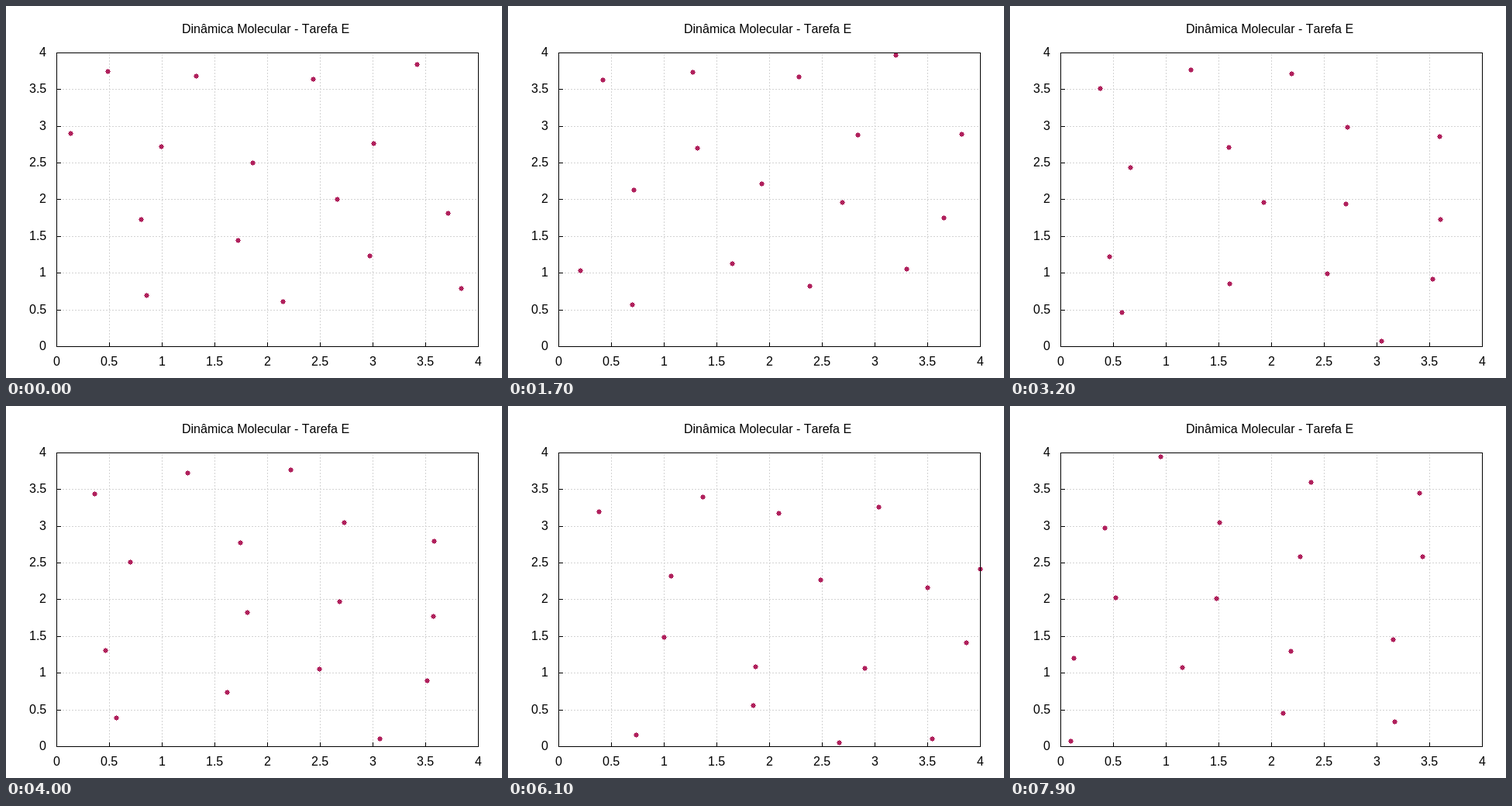
Recreate the animation shown at these times as an HTML page with a canvas. Size 640x480 px, loop 8000 ms.

```html
<!DOCTYPE html>
<html lang="pt">
<head>
<meta charset="utf-8">
<title>Dinâmica Molecular - Tarefa E</title>
<style>
html, body { margin: 0; width: 100%; height: 100%; overflow: hidden; background: #fff; }
canvas { display: block; }
</style>
</head>
<body>
<canvas id="stage" width="640" height="480"></canvas>
<script>
const ctx = document.getElementById('stage').getContext('2d');
const LEFT = 65, TOP = 60, RIGHT = 609, BOTTOM = 439;
const W = RIGHT - LEFT, H = BOTTOM - TOP;
const LOOP = 8000, STEP = 100, MID = 4000, END = 7900;

// Each particle drifts through three points; places outside the box wrap around.
const particles = [
  [[83, 164], [8, 174], [136, 247]],
  [[131, 84], [114, 113], [122, 157]],
  [[245, 90], [234, 86], [270, 150]],
  [[396, 94], [367, 82], [496, 28]],
  [[530, 75], [482, 50], [622, 53]],
  [[200, 181], [302, 176], [388, 98]],
  [[318, 202], [311, 266], [82, 325]],
  [[474, 177], [436, 150], [528, 112]],
  [[427, 249], [430, 252], [374, 194]],
  [[174, 275], [160, 201], [266, 248]],
  [[299, 302], [285, 369], [352, 396]],
  [[469, 322], [543, 354], [362, 316]],
  [[570, 267], [551, 271], [532, 194]],
  [[587, 364], [672, 315], [494, 301]],
  [[181, 373], [142, 402], [194, 444]],
  [[357, 381], [404, 339], [222, 337]]
];

// Cubic Hermite between p and q, with slopes m and n per unit of s.
function hermite(p, q, m, n, s) {
  const r = 1 - s;
  return p * r * r * (1 + 2 * s) + q * s * s * (3 - 2 * s) + s * r * (m * r - n * s);
}

function along([a, b, c], t) {
  const turn = (c - a) / END, late = END - MID;
  return t < MID
    ? hermite(a, b, b - a, turn * MID, t / MID)
    : hermite(b, c, turn * late, c - b, (t - MID) / late);
}

// Wraps an offset into (0, size].
const wrap = (v, size) => ((v % size) + size) % size || size;

function dotted(x1, y1, x2, y2) {
  ctx.beginPath();
  ctx.moveTo(x1, y1);
  ctx.lineTo(x2, y2);
  ctx.stroke();
}

function label(text, x, y, align) {
  const width = ctx.measureText(text).width;
  ctx.fillText(text, Math.round(x - width * align), y);
}

const tickX = k => LEFT + Math.round(W * k / 8);
const tickY = k => BOTTOM - Math.round(H * k / 8);

function drawGrid() {
  ctx.strokeStyle = '#d3d3d3';
  ctx.setLineDash([2, 2]);
  for (let k = 1; k < 8; k++) {
    dotted(tickX(k) + 0.5, BOTTOM + 1, tickX(k) + 0.5, TOP);
    dotted(LEFT, tickY(k) + 0.5, RIGHT, tickY(k) + 0.5);
  }
  ctx.setLineDash([]);
}

function drawParticle(x, y) {
  ctx.fillRect(x - 2, y - 2, 5, 5);
  ctx.fillRect(x - 3, y, 7, 1);
  ctx.fillRect(x, y - 3, 1, 7);
}

function drawAxes() {
  ctx.strokeStyle = ctx.fillStyle = '#000';
  ctx.strokeRect(LEFT + 0.5, TOP + 0.5, W, H);
  for (let k = 0; k <= 8; k++) {
    const x = tickX(k), y = tickY(k);
    ctx.fillRect(x, BOTTOM - 5, 1, 5);
    ctx.fillRect(LEFT, y, 6, 1);
    label(k / 2, x, 464, 0.5);
    label(k / 2, 52, y + 5, 1);
  }
  label('Dinâmica Molecular - Tarefa E', 335, 35, 0.5);
}

function draw(now) {
  const t = Math.floor((now % LOOP) / STEP) * STEP;
  ctx.fillStyle = '#fff';
  ctx.fillRect(0, 0, 640, 480);
  drawGrid();
  ctx.fillStyle = '#b0205c';
  for (const points of particles) {
    const x = Math.round(along(points.map(p => p[0]), t));
    const y = Math.round(along(points.map(p => p[1]), t));
    drawParticle(LEFT + wrap(x - LEFT, W), BOTTOM - wrap(BOTTOM - y, H));
  }
  drawAxes();
}

ctx.font = '16px "Liberation Sans", Arial, sans-serif';
ctx.fontKerning = 'none';
const start = performance.now();
function tick() {
  draw(performance.now() - start);
  requestAnimationFrame(tick);
}
tick();
</script>
</body>
</html>
```
